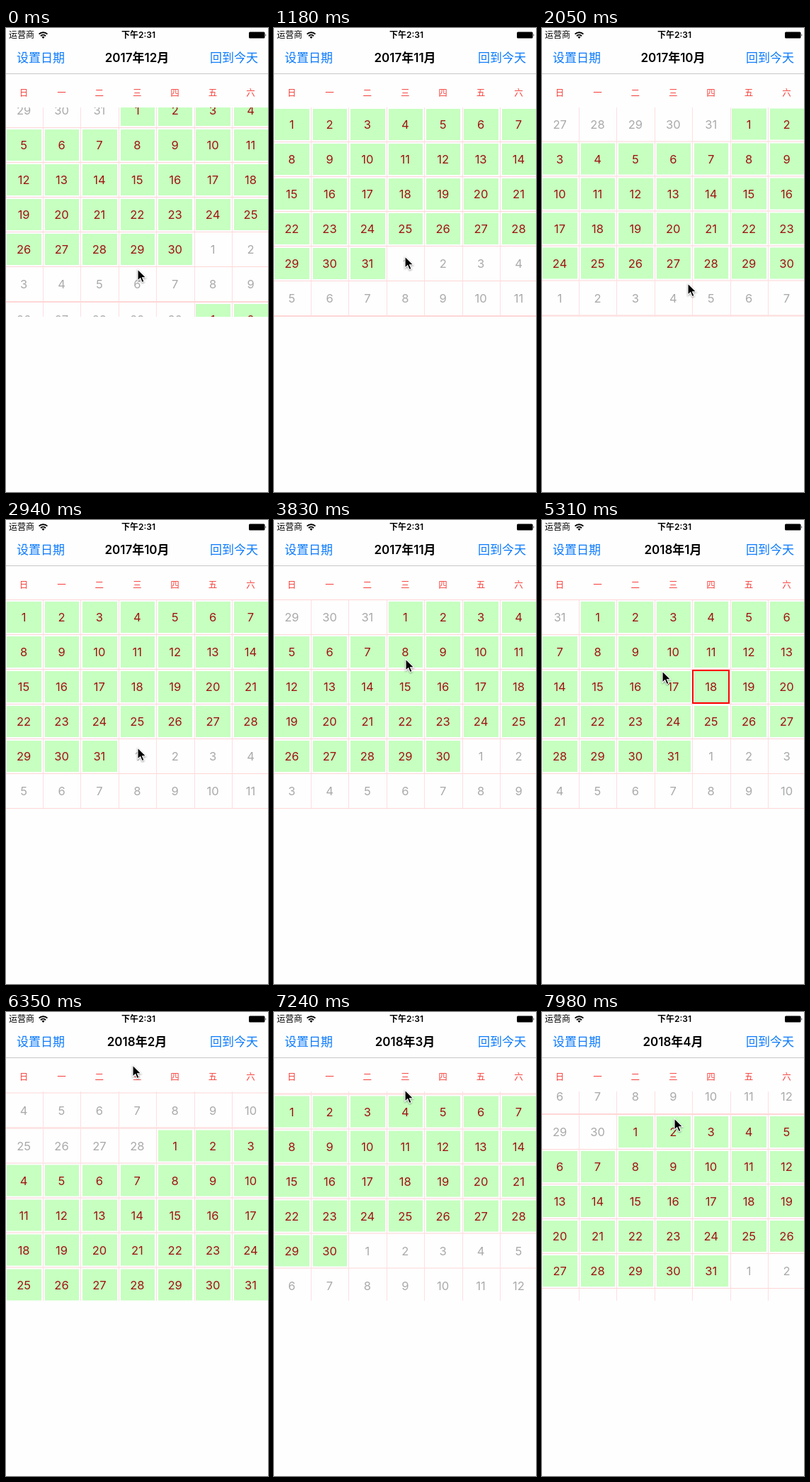
These frames come from a looping animation (370x654 px, 8 s). An HTML page:

```html
<!DOCTYPE html>
<html lang="zh-CN">
<head>
<meta charset="utf-8">
<title>日历</title>
<style>
  html, body { margin: 0; width: 100%; height: 100%; overflow: hidden; background: #fefefe; }
  #stage {
    position: relative; width: 370px; height: 654px; overflow: hidden;
    font-family: Inter, "Noto Sans CJK SC", "Noto Sans CJK", sans-serif;
  }
  #stage * { position: absolute; box-sizing: border-box; white-space: nowrap; }
  .status { top: 0; height: 20px; line-height: 20px; font-size: 12px; color: #000; }
  .clock { left: 87px; width: 200px; text-align: center; font-weight: 600; }
  .nav { top: 30px; height: 24px; line-height: 24px; font-size: 17px; color: #0a7aff; }
  #title { left: 85px; width: 200px; text-align: center; font-weight: 600; color: #000; }
  .rule { top: 64px; width: 370px; height: 1px; background: #c8c8c8; }
  .week { width: 40px; line-height: 19px; font-size: 12.5px; text-align: center; color: #f5403c; }
  #view { top: 112px; width: 370px; height: 295px; overflow: hidden; }
  #strip { top: 0; left: 0; width: 370px; }
  .page { width: 370px; height: 295px; border-bottom: 1px solid #ffd6d6; }
  .cell { width: 53.4px; height: 49px; border-top: 1px solid #ffd6d6; border-left: 1px solid #ffdde2; }
  .day {
    left: 1.8px; top: 2px; width: 48.4px; height: 44px; padding-right: 1px;
    line-height: 44px; font-size: 16.5px; text-align: center; color: #aaa;
  }
  .in { background: #c6ffc0; color: #a01410; }
  .today::after {
    content: ""; position: absolute; left: -1px; top: 0; width: 53px; height: 48px;
    box-sizing: border-box; border: 2px solid #f00;
  }
  svg { left: 0; top: 0; overflow: visible; }
</style>
</head>
<body>
<div id="stage">
  <div class="status" style="left:4px">运营商</div>
  <div class="status clock">下午2:31</div>
  <svg width="370" height="20">
    <g fill="none" stroke="#000" stroke-width="2">
      <path d="M46.6 8.6a8.4 8.4 0 0 1 11.8 0"/>
      <path d="M49 11.2a5 5 0 0 1 7 0"/>
    </g>
    <path d="M52.5 15l-2-2.2a2.9 2.9 0 0 1 4 0z"/>
    <rect x="343" y="5.5" width="22.5" height="9" rx="1.5"/>
    <path d="M366.5 8.3q1.8 1.7 0 3.4z"/>
  </svg>
  <div class="nav" style="left:15px">设置日期</div>
  <div class="nav" id="title"></div>
  <div class="nav" style="left:288px">回到今天</div>
  <div class="rule"></div>
  <div id="view"><div id="strip"></div></div>
  <svg id="cursor" width="14" height="20">
    <path d="M0 0V16.2L3.7 12.8 6.2 18.6 9 17.4 6.5 11.7H11.6Z" fill="#000" stroke="#fff" stroke-width="1.1"
      style="filter:drop-shadow(0 1px 1px #0006)"/>
  </svg>
</div>
<script>
const LOOP = 8000, STEP = 147.6;
const PAGE = 295, COL = 53.4, ROW = 49, LEFT = -1.4;
const FLICK = 480, DRAG = 160, HOLD = 240, READY = 260, REACH = 125;
const stage = document.getElementById('stage');
const strip = document.getElementById('strip');
const title = document.getElementById('title');
const cursor = document.getElementById('cursor');

// One flick per month: settle time and where the pointer lets go.
// The first three go back a month, the others go forward.
const flicks = [
  [226, 186, 340], [1275, 185, 322], [2172, 206, 360], [2930, 194, 200],
  [3690, 186, 196], [4490, 186, 71], [5230, 170, 195], [5800, 170, 88],
  [6638, 179, 75], [7370, 185, 110], [8225, 187, 150]
].map(([end, x, y], i) => {
  const dir = i < 3 ? -1 : 1;
  const to = Math.abs(i - 2);   // months since September 2017
  return { end, x, y, to, from: to - dir, start: end - FLICK, press: y + dir * REACH };
});

const mix = (a, b, u) => a + (b - a) * u;
const smooth = (a, b, t) => {
  const u = Math.min(1, Math.max(0, (t - a) / (b - a)));
  return u * u * (3 - 2 * u);
};

function add(parent, cls, left, top, text = '') {
  const el = document.createElement('div');
  el.className = cls;
  el.style.left = left + 'px';
  el.style.top = top + 'px';
  el.textContent = text;
  return parent.appendChild(el);
}

function addDay(page, date, i, inside) {
  const today = inside && date.getFullYear() === 2018 && date.getMonth() === 0 && date.getDate() === 18;
  const cell = add(page, today ? 'cell today' : 'cell', LEFT + COL * (i % 7), ROW * Math.floor(i / 7));
  const day = document.createElement('div');
  day.className = inside ? 'day in' : 'day';
  day.textContent = date.getDate();
  cell.append(day);
}

function addMonth(m) {
  const page = add(strip, 'page', 0, m * PAGE);
  const first = new Date(2017, 8 + m, 1);
  for (let i = 0; i < 42; i++) {
    const date = new Date(2017, 8 + m, 1 + i - first.getDay());
    addDay(page, date, i, date.getMonth() === first.getMonth());
  }
}

function scrollAt(t) {
  const { end, from, to } = flicks.find(f => t < f.end);
  const left = Math.min(1, (end - t) / FLICK);
  return { month: from, pos: mix(to, from, left ** 3.5) };
}

// Drag to the release point, hold, then travel to the next press point.
function pointerAt(t) {
  const i = flicks.findLastIndex(f => t >= f.start);
  const now = flicks[i], next = flicks[i + 1];
  const y = mix(now.press, now.y, smooth(now.start, now.start + DRAG, t));
  if (!next) return [now.x, y];
  const leave = now.start + DRAG + HOLD;
  const u = smooth(leave, Math.max(leave + 50, next.start - READY), t);
  return [mix(now.x, next.x, u), mix(y, next.press, u)];
}

function draw(now) {
  // The screen refreshes in coarse, even steps.
  const t = Math.floor((now % LOOP + 16) / STEP) * STEP;
  const { month, pos } = scrollAt(t);
  const date = new Date(2017, 8 + month, 1);
  const [x, y] = pointerAt(t);
  title.textContent = `${date.getFullYear()}年${date.getMonth() + 1}月`;
  strip.style.transform = `translateY(${-Math.round(pos * PAGE * 2) / 2}px)`;
  cursor.style.transform = `translate(${Math.round(x)}px, ${Math.round(y)}px)`;
}

[...'日一二三四五六'].forEach((name, i) => add(stage, 'week', 5 + COL * i, 82, name));
for (let m = 0; m < 9; m++) addMonth(m);
stage.append(cursor);

const start = performance.now();
function tick() {
  draw(performance.now() - start);
  requestAnimationFrame(tick);
}
tick();
</script>
</body>
</html>
```
